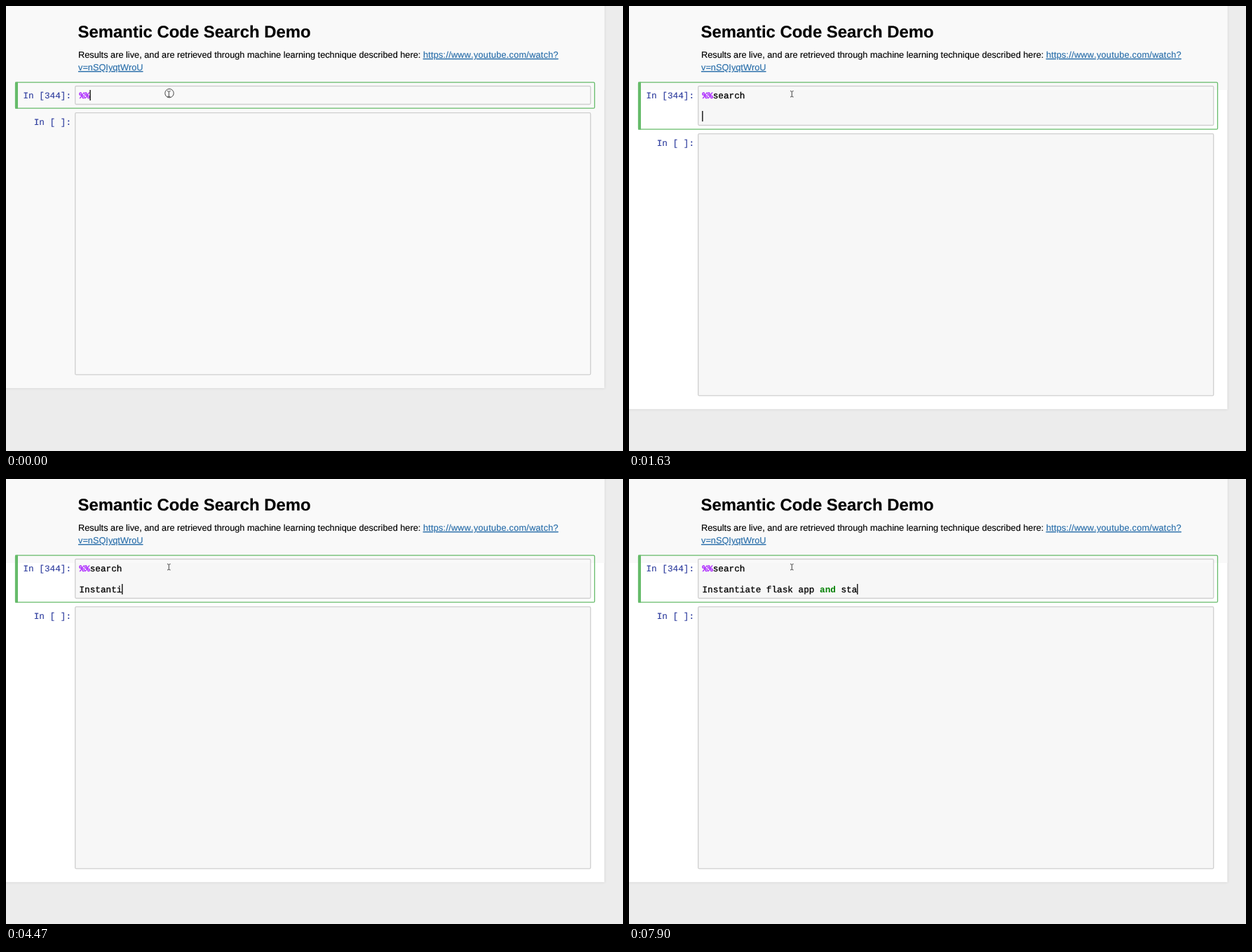
Write an HTML page that moves like this. It is 880x636 px and loops after 8 s.

```html
<!DOCTYPE html>
<html lang="en">
<head>
<meta charset="utf-8">
<title>Semantic Code Search Demo</title>
<style>
  html, body { margin: 0; width: 100%; height: 100%; overflow: hidden; background: #ececec; }
  svg { display: block; }
  text { font: 12.75px "Liberation Sans", Arial, sans-serif; font-kerning: none;
         text-rendering: geometricPrecision; white-space: pre; stroke: #000; stroke-width: .15px; }
  .title { font-size: 23.9px; font-weight: bold; }
  .link { fill: #296eaa; stroke: #296eaa; text-decoration: underline; }
  .wide { letter-spacing: .22px; }
  .mono { font: 12.7px "Liberation Mono", "Courier New", monospace; }
  .prompt { fill: #303f9f; stroke: #303f9f; text-anchor: end; }
  .code { stroke-width: .3px; }
  .magic { fill: #a2f; stroke: #a2f; stroke-width: .5px; }
  .keyword { fill: #008000; stroke: none; font-weight: bold; }
  .box { fill: none; stroke: #cfcfcf; stroke-width: 1.3px; }
  .pointer { fill: none; stroke: #444; }
  #page { filter: drop-shadow(0 .5px 1.5px rgba(87, 87, 87, .25)); }
</style>
</head>
<body>
<svg width="880" height="636" viewBox="0 0 880 636">
  <rect id="page" x="-9" y="-9" width="862.5"/>
  <rect id="activeFill" x="98.7" y="114.5" width="735"/>
  <rect id="emptyFill" x="98.7" width="735" height="374.2"/>
  <rect width="853.5" height="120" fill="#f9f9f9"/>

  <text class="title" x="102.6" y="45">Semantic Code Search Demo</text>
  <text x="103" y="74">Results are live, and are retrieved through machine learning technique described here: <tspan class="link wide">https://www.youtube.com/watch?</tspan></text>
  <text class="link" x="103" y="92">v=nSQIyqtWroU</text>

  <rect id="activeFrame" x="13.5" y="109.2" width="826" rx="1.5" fill="none" stroke="#66bb6a" stroke-width="1.3"/>
  <rect id="activeBar" x="13" y="108.7" width="4" fill="#66bb6a"/>
  <rect id="activeBox" class="box" x="98.7" y="114.5" width="735" rx="1.5"/>
  <text class="mono prompt" x="93" y="131.5">In [344]:</text>
  <text class="mono code" x="104.5" y="131.5"><tspan class="magic">%%</tspan><tspan id="command"></tspan></text>
  <text class="mono code" x="104.5" y="161.5"><tspan id="before"></tspan><tspan id="word"></tspan><tspan id="after"></tspan></text>
  <rect id="caret" width="1.3" height="15"/>

  <g id="emptyCell">
    <rect class="box" x="98.7" y="152.7" width="735" height="374.2" rx="1.5"/>
    <text class="mono prompt" x="93" y="169.7">In [ ]:</text>
  </g>

  <path class="pointer" d="M230 121.5q2 0 2.3 1q.3-1 2.3-1M232.3 122v7.5M230 130q2 0 2.3-1q.3 1 2.3 1"/>
  <circle id="click" class="pointer" cx="233" cy="124.7" r="6.2"/>
</svg>
<script>
const LOOP = 8000, LINE = 15, CHAR = 7.62;
const SCRIPT = "%%search\n\nInstantiate flask app and sta";
const WORD_AT = 22;

// [time in ms, characters typed so far]
const KEYS = [
  [0, 2], [450, 3], [600, 4], [745, 6], [890, 7], [1040, 8], [1330, 9], [1630, 10],
  [2680, 11], [2830, 12], [2970, 13], [3870, 14], [4170, 16], [4470, 18],
  [5070, 19], [5220, 20], [5360, 22], [5660, 23], [5810, 24], [5960, 26],
  [6110, 27], [6260, 28], [6410, 30], [6560, 31], [6710, 32], [6860, 33],
  [7010, 34], [7150, 36], [7300, 37], [7600, 38], [7900, 39]
];
const CARET_OFF = [[2230, 2680], [3420, 3870]];
const PAGE_FILL = ["#f9f9f9", "#fff", "#fff"];
const INPUT_FILL = ["#f9f9f9", "#f6f8f7", "#f7f7f7"];

const $ = id => document.getElementById(id);
const set = (id, attrs) => {
  for (const name in attrs) $(id).setAttribute(name, attrs[name]);
};
const show = (id, visible) => set(id, { visibility: visible ? "visible" : "hidden" });

function draw(t) {
  const typed = KEYS.findLast(([time]) => time <= t)[1];
  const lines = SCRIPT.slice(0, typed).split("\n");
  const row = lines.length - 1;
  const grow = row * LINE;
  const query = lines[2] || "";
  const word = query.slice(WORD_AT, WORD_AT + 3);

  set("page", { height: 555.3 + grow, fill: PAGE_FILL[row] });
  set("activeFill", { height: 26 + grow, fill: INPUT_FILL[row] });
  set("activeBox", { height: 26 + grow });
  set("activeFrame", { height: 37 + grow });
  set("activeBar", { height: 38 + grow });
  set("emptyFill", { y: 152.7 + grow, fill: INPUT_FILL[row] });
  set("emptyCell", { transform: `translate(0 ${grow})` });

  $("command").textContent = lines[0].slice(2);
  $("before").textContent = query.slice(0, WORD_AT);
  $("word").textContent = word;
  $("after").textContent = query.slice(WORD_AT + 3);
  set("word", { class: word === "and" ? "keyword" : "" });

  set("caret", { x: 104.2 + lines[row].length * CHAR, y: 120 + grow });
  show("caret", !CARET_OFF.some(([from, to]) => t >= from && t < to));
  show("click", t < 150);
}

function tick() {
  draw(performance.now() % LOOP);
  requestAnimationFrame(tick);
}
tick();
</script>
</body>
</html>
```
